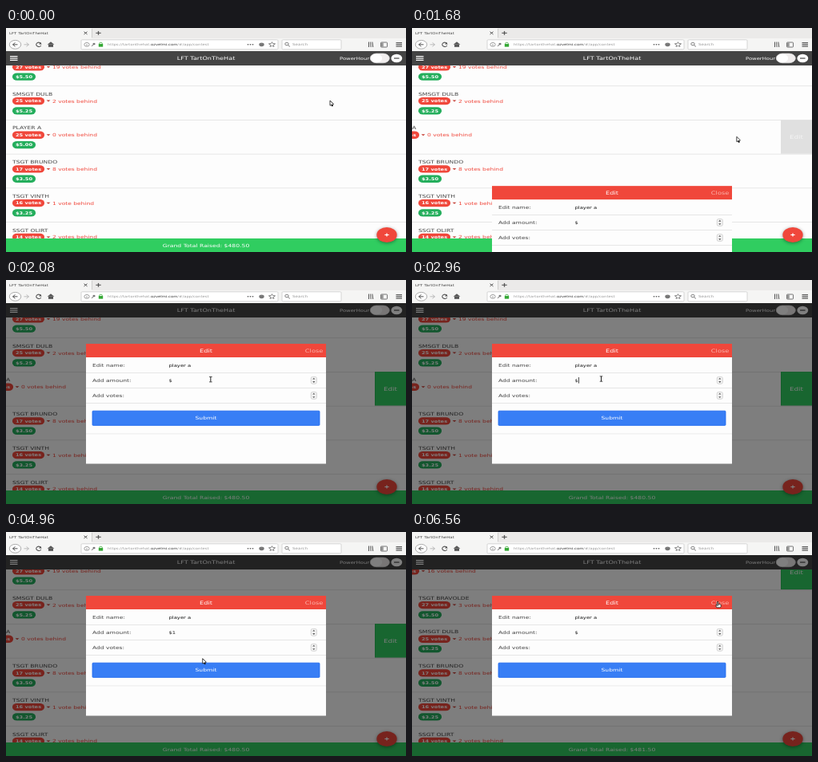
Recreate the animation shown at these times as an HTML page with a canvas. Size 500 px wide and 281 px high, loop 6.72 s.

```html
<!DOCTYPE html>
<html lang="en">
<head>
<meta charset="utf-8">
<title>Contest</title>
<style>
  html, body { margin: 0; width: 100%; height: 100%; overflow: hidden; background: #fff; }
  canvas { display: block; width: 500px; height: 281px; }
</style>
</head>
<body>
<canvas id="stage" width="500" height="281"></canvas>
<script>
const ctx = document.getElementById('stage').getContext('2d');
const LOOP = 6720, STEP = 80;
// A 4:3 screen is shown at 16:9, so glyphs and circles are all wider by this ratio.
const WIDE = 4 / 3;
const RED = '#f0473b', GREEN = '#30cd60', BADGE = '#24ae5c', BLUE = '#387ef5';
const INK = '#444', ICON = '#555', PAPER = '#fdfdfd';
const ROW_TOP = 29.7, ROW_H = 42.7, SWIPE = 39;
const LEADER_VOTES = 46;
const PRESS = 1600, TYPED = 4560, SUBMITTED = 5360;

const player = (name, votes, paid) => ({ name, votes, paid });
const HERO = player('PLAYER A', 25, 5);
const PLAYERS = [
  player('TSGT BRAVOLDE', 27, 5.5), player('SMSGT DULB', 25, 5.25), HERO,
  player('TSGT BRUNDO', 17, 3.5), player('TSGT VINTH', 16, 3.25), player('SSGT OLIRT', 14, 3)
];

const SPOT = {
  start: [405, 91], row: [438, 138], dragged: [398, 138], edit: [476, 142],
  sheet: [265.5, 125], amount: [236.5, 124], submit: [249, 171], close: [383, 91]
};

const ramp = (t, from, to) => Math.min(1, Math.max(0, (t - from) / (to - from)));
const mix = (a, b, u) => a + (b - a) * u;

function pointerAt(t) {
  let spot = SPOT.start;
  const glide = (name, from, to) => {
    const u = ramp(t, from, to);
    spot = spot.map((v, i) => mix(v, SPOT[name][i], u));
  };
  glide('row', 0, 880);
  glide('dragged', 880, 1200);
  glide('edit', 1200, 1520);
  glide('sheet', PRESS, 1840);
  glide('amount', 1840, 2560);
  glide('submit', 3600, 5440);
  glide('close', 5600, 6560);
  return spot;
}

function box(x, y, w, h, color) {
  ctx.fillStyle = color;
  ctx.fillRect(x, y, w, h);
}

function paint(fill, stroke, width = .8) {
  if (fill) { ctx.fillStyle = fill; ctx.fill(); }
  if (stroke) { ctx.strokeStyle = stroke; ctx.lineWidth = width; ctx.stroke(); }
}

function pill(x, y, w, h, r, fill, stroke) {
  ctx.beginPath();
  ctx.roundRect(x, y, w, h, { x: r * WIDE, y: r });
  paint(fill, stroke);
}

function disc(x, y, r, fill, stroke) {
  ctx.beginPath();
  ctx.ellipse(x, y, r * WIDE, r, 0, 0, 7);
  paint(fill, stroke);
}

function line(points, color, width = 1) {
  ctx.beginPath();
  points.forEach(([x, y]) => ctx.lineTo(x, y));
  paint(null, color, width);
}

function shape(points, fill, stroke) {
  ctx.beginPath();
  points.forEach(([x, y]) => ctx.lineTo(x, y));
  ctx.closePath();
  paint(fill, stroke);
}

// A triangle pointing up, or down when h is negative.
function wedge(x, y, w, h, color) {
  shape([[x - w, y], [x + w, y], [x, y - h]], color);
}

function plus(x, y, r, color) {
  line([[x - r * WIDE, y], [x + r * WIDE, y]], color, 1.1);
  line([[x, y - r], [x, y + r]], color, 1.3);
}

// y is the middle of the capitals, size the height of the em.
function text(str, x, y, size, color, align = 'left', weight = '') {
  ctx.save();
  ctx.translate(x, y + size * .36);
  ctx.scale(WIDE, 1);
  ctx.font = `${weight} ${size}px "DejaVu Sans", sans-serif`;
  ctx.textAlign = align;
  ctx.fillStyle = color;
  ctx.fillText(str, 0, 0);
  ctx.restore();
  return ctx.measureText(str).width;
}

function bars(x, y, w, gap, color) {
  for (const k of [-1, 0, 1]) line([[x, y + k * gap], [x + w, y + k * gap]], color, 1.2);
}

function arrowIcon(x, y, side, color) {
  line([[x - 3, y], [x + 3, y]], color);
  line([[x, y - 2.4], [x + 3 * side, y], [x, y + 2.4]], color);
}

function magnifier(x, y) {
  disc(x, y, 1.7, null, '#666');
  line([[x + 1.6, y + 1.3], [x + 3.8, y + 3.4]], '#666');
}

function drawTabs() {
  box(0, 0, 500, 13, '#ebeae9');
  box(0, 0, 107, 13, '#f5f5f4');
  line([[107.5, 1], [107.5, 12]], '#bbb', .6);
  text('LFT TartOnTheHat', 4, 6.3, 4.1, '#444');
  for (const side of [-1, 1]) line([[99.5 - 2 * side, 4.7], [99.5 + 2 * side, 7.9]], ICON);
  plus(115.5, 6.3, 2.4, ICON);
}

function drawToolbar() {
  const y = 20.8;
  box(0, 13, 500, 16, '#f5f5f4');
  disc(11.5, y, 5.4, '#fff', '#999');
  arrowIcon(11.5, y, -1, ICON);
  arrowIcon(25.5, y, 1, '#bbb');
  ctx.beginPath();
  ctx.ellipse(41, y, 3.2, 2.6, 0, .5, 5.6);
  paint(null, ICON, 1.1);
  wedge(43, y - .3, 1.8, 2.4, ICON);
  wedge(56, y, 4.4, 3.6, ICON);
  box(53, y, 6, 3, ICON);

  pill(94, 14.8, 246, 12, 1, '#fff', '#ccc');
  disc(101, y, 2.4, null, '#888');
  line([[101, 20.4], [101, 22.2]], '#888');
  disc(110, 20, 1.2, '#777');
  line([[109.5, 20.5], [107, 23]], '#777');
  disc(118.5, 19.6, 1.4, null, '#35a835');
  box(115.8, 20, 5.4, 3.6, '#35a835');
  let x = 127;
  const address = [['https://tartonthehat.', '#999'], ['ozvelmi.com', '#333'], ['/#/app/contest', '#999']];
  for (const [part, color] of address) {
    x += text(part, x, y, 3.96, color) || 0;
  }
  for (const dx of [-3, 0, 3]) disc(305.5 + dx, y, .7, ICON);
  disc(319.5, y, 2.4, '#777');
  const star = Array.from({ length: 10 }, (_, i) => {
    const r = i % 2 ? 1.5 : 3.2, a = i * Math.PI / 5;
    return [332.5 + r * WIDE * Math.sin(a), y - r * Math.cos(a)];
  });
  shape(star, '#fff', '#666');

  pill(345, 14.8, 74, 12, 1, '#fff', '#ccc');
  magnifier(351, 20);
  text('Search', 358, y, 4.2, '#999');
  for (const dx of [0, 2.2, 4.4]) line([[453.5 + dx, 17.5], [453.5 + dx * 1.2, 24]], ICON);
  pill(468.5, 18, 8, 6, .7, null, ICON);
  box(469, 18.3, 2.8, 5.4, '#999');
  bars(487.5, y, 7.5, 2.2, ICON);
}

function drawHeader() {
  box(0, 29, 500, 18, INK);
  bars(5, 38, 9.5, 2.4, '#fff');
  text('LFT TartOnTheHat', 250, 38, 6.1, '#fff', 'center');
  text('PowerHour', 454, 38, 5.1, '#fff', 'right');
  pill(455.3, 32.1, 24, 11.6, 5.8, '#f1eeee', '#ddd');
  disc(463, 37.9, 5.4, '#fff');
  disc(488.3, 38, 5.2, '#fff');
  line([[485, 38], [491.6, 38]], INK, 1.2);
}

function badge(label, x, y, w, color) {
  pill(x, y - 4.6, w, 9.3, 4.2, color);
  text(label, x + w / 2, y, 5, '#fff', 'center', 'bold');
}

function drawRow({ name, votes, paid }, behind, y, shift, pressed) {
  const x = 8 - shift;
  if (shift) {
    box(500 - SWIPE, y, SWIPE, ROW_H, pressed ? '#e0e0e0' : '#28b653');
    if (!pressed) box(500 - SWIPE + .7, y + .7, SWIPE, ROW_H - 1.4, GREEN);
    text('Edit', 480.5, y + 21.4, 6.6, pressed ? '#f4f4f4' : '#fff', 'center');
  }
  box(-shift, y, 500, ROW_H, PAPER);
  box(-shift, y, 500, .7, '#ddd');
  text(name, x, y + 10.3, 5.75, INK);
  badge(`${votes} votes`, x, y + 19.1, 40, RED);
  wedge(x + 45, y + 18.2, 2.4, -2, '#c43c32');
  text(`${behind} vote${behind === 1 ? '' : 's'} behind`, x + 50, y + 19.1, 5.65, RED);
  badge(`$${paid.toFixed(2)}`, x, y + 31.4, 29, BADGE);
}

function drawList(t) {
  const updated = t >= SUBMITTED;
  const hero = updated ? player(HERO.name, HERO.votes + 5, HERO.paid + 1) : HERO;
  const rows = PLAYERS.map(p => p === HERO ? hero : p).sort((a, b) => b.votes - a.votes);
  const shift = SWIPE * ramp(t, 880, 1200);
  const pressed = t >= PRESS && t < PRESS + 160;
  box(0, 47, 500, 234, PAPER);
  rows.forEach((row, i) => {
    const ahead = i ? rows[i - 1].votes : LEADER_VOTES;
    drawRow(row, ahead - row.votes, ROW_TOP + i * ROW_H, row === hero ? shift : 0, pressed);
  });
  box(0, 264, 500, 17, GREEN);
  text(`Grand Total Raised: $${updated ? 481 : 480}.50`, 250, 272.5, 5.75, '#fff', 'center');
  ctx.save();
  ctx.shadowColor = 'rgba(0,0,0,.4)';
  ctx.shadowBlur = 4;
  ctx.shadowOffsetY = 1;
  disc(476, 259.5, 9.5, RED);
  ctx.restore();
  plus(476, 259.5, 2, '#fff');
}

function drawSpinner(y) {
  pill(381.3, y - 4.4, 7, 8.8, 1.6, '#f4f4f4', '#ccc');
  for (const side of [-1, 1]) wedge(384.8, y + 1.3 * side, 1.6, -1.8 * side, '#555');
}

function drawSheet(t) {
  const left = (1 - ramp(t, 1610, 1910)) ** 2;
  if (left === 1) return;
  const lit = t >= 2960 && t < 3440 && Math.floor((t - 2960) / 160) % 2 === 0;
  ctx.save();
  ctx.translate(0, mix(80, 281, left));
  box(100, 0, 300, 150.5, PAPER);
  box(100, 0, 300, 17, RED);
  text('Edit', 250, 8.3, 6.2, '#fff', 'center');
  text('Close', 396.3, 8.3, 6.2, '#fbb5ae', 'right');
  ['Edit name:', 'Add amount:', 'Add votes:'].forEach((label, i) => {
    const y = 26.7 + i * 19.1;
    text(label, 108, y, 5.65, INK);
    box(100, y + 9.3, 300, .7, '#ddd');
    if (i) drawSpinner(y);
  });
  box(100, 112.6, 300, .7, '#e2e2e2');
  text('player a', 203.5, 26.7, 5.1, '#111');
  text(t >= TYPED && t < SUBMITTED ? '$1' : '$', 203.5, 45.8, 5.1, '#222');
  if (lit) box(208.2, 42, .8, 7.6, '#222');
  pill(108, 84.2, 284, 18.2, .8, BLUE, '#1c68ee');
  text('Submit', 250, 93.3, 5.75, '#fff', 'center');
  ctx.restore();
}

function drawArrow() {
  line([[1.8, 4], [3.2, 7.2]], '#111', 2);
  shape([[0, 0], [0, 6.2], [4.6, 4.5]], '#fff', '#111');
}

function drawBeam() {
  line([[0, -3], [0, 3]], '#222');
  for (const y of [-3.2, 3.2]) line([[-1.8, y], [1.8, y]], '#222', .8);
}

function drawHand() {
  pill(-2.8, -.4, 6, 4.2, 1.2, '#fff', '#111');
  pill(-1.7, -3.6, 1.6, 5, .6, '#fff', '#111');
}

function drawPointer(t) {
  const [x, y] = pointerAt(t);
  const inside = (x0, y0, x1, y1) => x > x0 && x < x1 && y > y0 && y < y1;
  const open = t > 1840;
  const onEdit = t > 1200 && t <= PRESS && x > 500 - SWIPE;
  const onButton = inside(108, 164, 392, 183) || inside(373, 80, 400, 97);
  ctx.save();
  ctx.translate(x, y);
  if (onEdit || open && onButton) drawHand();
  else if (open && inside(203, 97, 380, 154)) drawBeam();
  else drawArrow();
  ctx.restore();
}

function draw(t) {
  drawList(t);
  drawTabs();
  drawToolbar();
  drawHeader();
  box(0, 29, 500, 252, `rgba(0,0,0,${.5 * ramp(t, 1680, 1890)})`);
  drawSheet(t);
  drawPointer(t);
}

// Measuring happens after the stretch is undone, so widths are scaled back up here.
const plainText = text;
text = (...args) => {
  const [str, , , size, , , weight = ''] = args;
  plainText(...args);
  ctx.font = `${weight} ${size}px "DejaVu Sans", sans-serif`;
  return ctx.measureText(str).width * WIDE;
};

const start = performance.now();
function tick() {
  const t = (performance.now() - start) % LOOP;
  draw(Math.floor(t / STEP) * STEP);
  requestAnimationFrame(tick);
}
tick();
</script>
</body>
</html>
```
